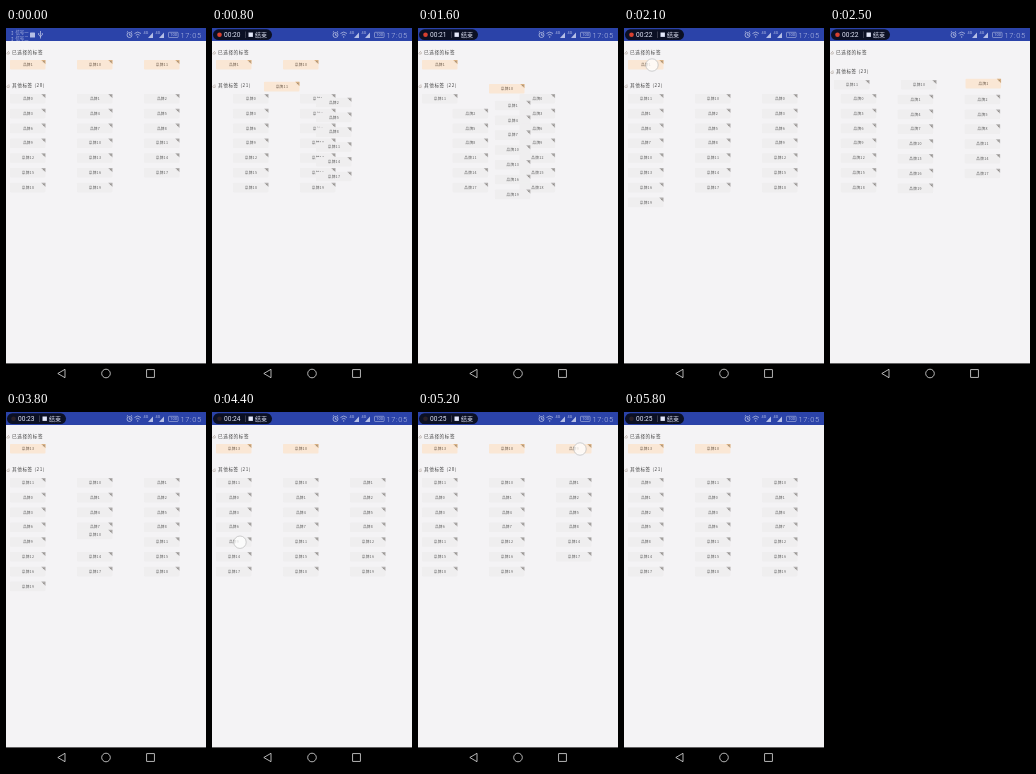
An HTML page that plays this animation: 200 px wide and 356 px high, repeating every 6 s.

```html
<!DOCTYPE html>
<html lang="zh">
<head>
<meta charset="utf-8">
<style>
html, body { margin: 0; width: 100%; height: 100%; overflow: hidden; background: #f4f3f5; }
svg { display: block; width: 100%; height: 100%; }
text { font-family: "Noto Sans CJK SC", "Noto Sans CJK", sans-serif; }
.chip rect { fill: #efeeef; }
.chip .corner { fill: #b2b0b0; }
.chip text { font-size: 3.6px; letter-spacing: .35px; font-weight: 300; fill: #5c5c5c; text-anchor: middle; }
.chip.chosen rect { fill: #fae7d5; }
.chip.chosen .corner { fill: #d8b083; }
.chip.chosen text { fill: #6a5848; }
.head text { font-size: 4.6px; letter-spacing: .6px; fill: #444; }
.head path { fill: none; stroke: #b5aaa2; stroke-width: .7; }
.line { fill: none; stroke: #fff; stroke-width: .7; }
.status { fill: #e4e8fa; }
.status text { font-family: Roboto, "Noto Sans CJK SC", sans-serif; }
.dim { opacity: .75; }
</style>
</head>
<body>
<svg viewBox="0 0 200 356">
  <rect width="200" height="356" fill="#f4f3f5"/>
  <g class="head" transform="translate(0 24)">
    <path d="M.5 1.5 3 -1 M.8 2H3.2V0"/>
    <text x="6" y="1.7" font-weight="500">已选择的标签</text>
  </g>
  <g class="head" id="otherHead">
    <path d="M.5 1.5 3 -1 M.8 2H3.2V0"/>
    <text x="6" y="1.7" id="count"></text>
  </g>
  <g id="chips"></g>
  <circle id="touch" r="6.2" fill="#fff" fill-opacity=".75" stroke="#bbb" stroke-width=".7"/>

  <rect width="200" height="13" fill="#2b43a9"/>
  <g class="status">
    <g id="carrier" class="dim" font-size="4.4">
      <text x="4" y="5.8">↕ 信号一</text>
      <text x="4" y="11.6">↕ 信号二</text>
      <rect x="24" y="4.5" width="5" height="5" rx=".6"/>
      <path class="line" d="M34.5 3V10.5M32.7 5V7L34.5 8.5 36.3 7V5"/>
    </g>
    <g id="recorder">
      <rect x="1" y="1.3" width="59" height="10.8" rx="5.4" fill="#0b1024"/>
      <circle id="dot" cx="7.5" cy="6.7" r="2.3"/>
      <text id="clock" x="12" y="9.1" font-size="6.6"></text>
      <path d="M33.5 3.5V10" stroke="#667" stroke-width=".5"/>
      <rect x="36.5" y="4.5" width="4.4" height="4.4"/>
      <text x="43" y="9" font-size="6">结束</text>
    </g>
    <g class="dim">
      <g class="line">
        <circle cx="123.5" cy="7" r="2.5"/>
        <path d="M123.5 5.5V7.2H125M120.8 4.4 122 3.3M126.2 4.4 125 3.3"/>
        <path d="M128.5 5.5Q131.7 2.6 135 5.5M129.8 7.2Q131.7 5.5 133.6 7.2M131.7 8.2V9.8"/>
        <rect x="162.5" y="4.3" width="9.6" height="5.2" rx=".7" stroke-width=".5"/>
      </g>
      <path d="M142 10h5V4.5ZM153 10h5V4.5Z"/>
      <text x="137.5" y="6.3" font-size="3.8">4G</text>
      <text x="149.5" y="6.3" font-size="3.8">4G</text>
      <text x="164.2" y="8.4" font-size="4">100</text>
      <text x="174.5" y="9.5" font-size="7.5" font-weight="300" letter-spacing=".6">17:05</text>
    </g>
  </g>

  <rect y="335.4" width="200" height="20.6" fill="#000"/>
  <g class="line">
    <path d="M51.8 345.5 59 341.3V349.7Z"/>
    <circle cx="100" cy="345.5" r="4.3"/>
    <rect x="140.7" y="341.7" width="7.6" height="7.6"/>
  </g>
</svg>
<script>
const LOOP = 6000, COLUMN = 67, ROW = 14.8, MOVE = 360, SHIFT = 250;
const INSERT_SLOT = 4; // fixed list position, counting both headings
const $ = id => document.getElementById(id);

// Taps: start time, lag of the other chips, index within the chosen or other chips
const taps = [
  { at: 588, delay: 129, chosen: 2 },
  { at: 1373, delay: 110, chosen: 1 },
  { at: 2172, delay: 115, chosen: 0 },
  { at: 2953, delay: 67, other: 16 },
  { at: 3735, delay: 67, other: 13 },
  { at: 4460, delay: 67, other: 12 },
  { at: 5245, delay: 115, chosen: 2 }
];

const labels = Array.from({ length: 20 }, (_, i) => i).concat(1, 10, 11);
const chips = labels.map(n => {
  const g = document.createElementNS("http://www.w3.org/2000/svg", "g");
  g.innerHTML = `<rect width="35.5" height="9.6" rx=".8"/>
    <path class="corner" d="M31.2 0H35.5V4.3Z"/>
    <path d="M33.1 1.1 34.6 2.6M34.6 1.1 33.4 2.3" stroke="#807a75" stroke-width=".5"/>
    <text x="18" y="6.1">品牌${n}</text>`;
  $("chips").append(g);
  return g;
});

function layout(chosen, other) {
  const base = 66 - (chosen.length ? 0 : ROW), spots = [];
  const place = (ids, top) => ids.forEach((id, i) => {
    spots[id] = { x: 4 + i % 3 * COLUMN, y: top + Math.floor(i / 3) * ROW };
  });
  place(chosen, 32);
  place(other, base);
  return { chosen, other, spots, head: base - 8.6 };
}

const states = [layout([20, 21, 22], Array.from({ length: 20 }, (_, i) => i))];
for (const tap of taps) {
  const last = states[states.length - 1];
  const chosen = [...last.chosen], other = [...last.other];
  if ("chosen" in tap) {
    [tap.id] = chosen.splice(tap.chosen, 1);
    other.splice(INSERT_SLOT - chosen.length - 2, 0, tap.id);
  } else {
    [tap.id] = other.splice(tap.other, 1);
    chosen.push(tap.id);
  }
  states.push(layout(chosen, other));
}

const ease = p => (1 - Math.cos(Math.PI * Math.min(1, Math.max(0, p)))) / 2;
const mix = (a, b, p) => a + (b - a) * p;
const show = (node, on) => node.setAttribute("visibility", on ? "visible" : "hidden");
const move = (node, x, y) => node.setAttribute("transform", `translate(${x.toFixed(2)} ${y.toFixed(2)})`);
let stacked = -1;

function draw(t) {
  const step = taps.filter(tap => tap.at <= t).length;
  const to = states[step], from = states[Math.max(0, step - 1)];
  const tap = taps[step - 1] || { at: -LOOP, delay: 0, id: -1 };
  const lead = (t - tap.at) / MOVE;
  const shift = ease((t - tap.at - tap.delay) / SHIFT);

  if (step !== stacked) {
    [...to.chosen, ...to.other].forEach(id => $("chips").append(chips[id]));
    if (tap.id >= 0) $("chips").append(chips[tap.id]);
    $("count").textContent = `其他标签 (${to.other.length})`;
    stacked = step;
  }
  chips.forEach((chip, id) => {
    const p = id === tap.id ? ease(lead) : shift, a = from.spots[id], b = to.spots[id];
    const look = id === tap.id && lead < 1 ? from : to;
    move(chip, mix(a.x, b.x, p), mix(a.y, b.y, p));
    chip.setAttribute("class", look.chosen.includes(id) ? "chip chosen" : "chip");
  });
  move($("otherHead"), 0, mix(from.head, to.head, shift));

  const next = taps[step], pressed = next && t >= next.at - 85;
  show($("touch"), pressed);
  if (pressed) move($("touch"), to.spots[next.id].x + 24, to.spots[next.id].y + 5);

  show($("carrier"), t < 100);
  show($("recorder"), t >= 100);
  $("clock").textContent = "00:" + (20 + Math.floor((t + 100) / 1000));
  $("dot").setAttribute("fill", t < 2900 ? "#d8402f" : "#2a2027");
}

const begin = performance.now();
function tick() {
  draw((performance.now() - begin) % LOOP);
  requestAnimationFrame(tick);
}
tick();
</script>
</body>
</html>
```
